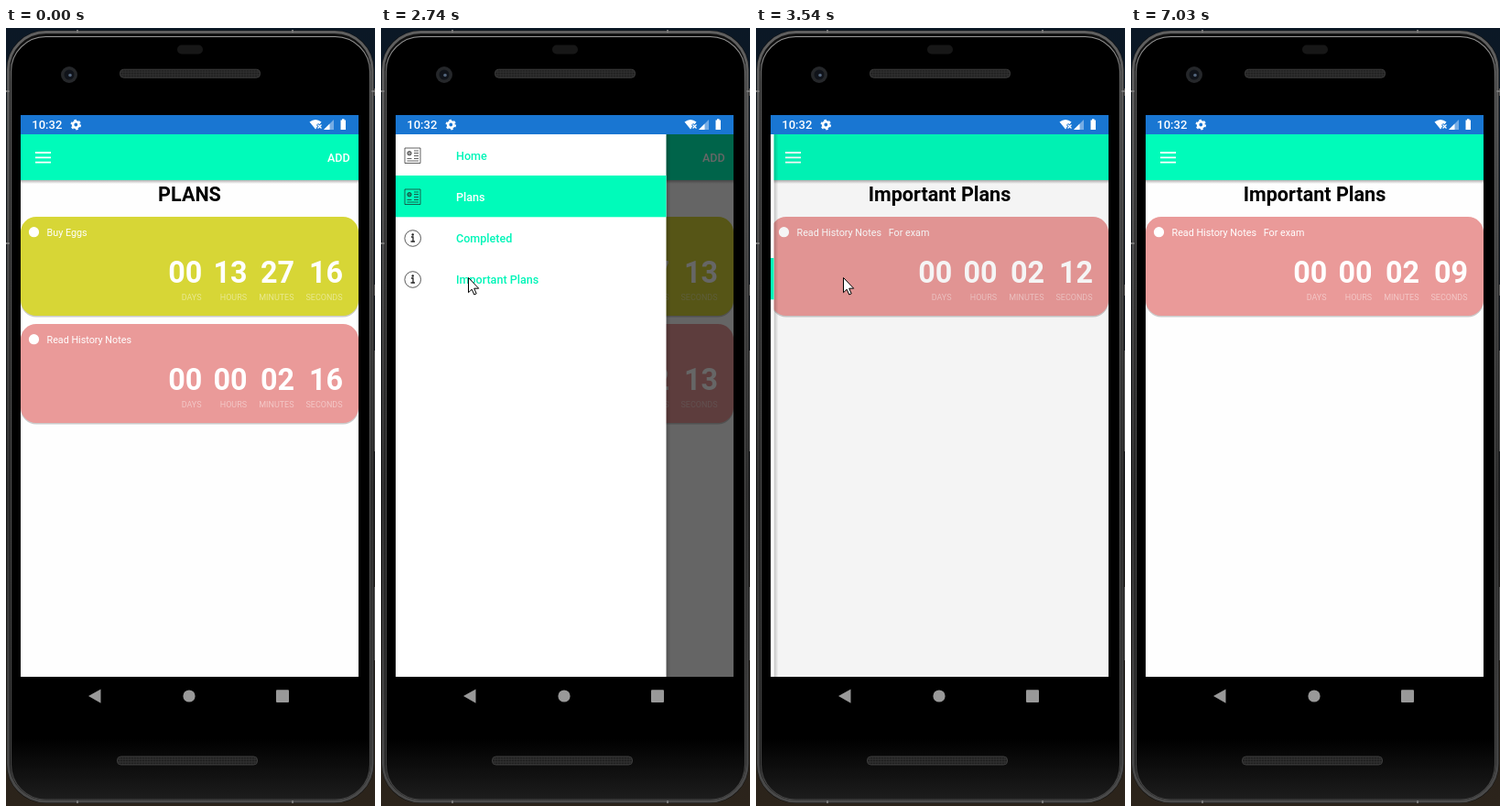
These frames come from a looping animation (403x849 px, 7290 ms). An HTML page:

```html
<!DOCTYPE html>
<html lang="en">
<head>
<meta charset="utf-8">
<title>Plans</title>
<style>
  html, body { margin: 0; width: 100%; height: 100%; overflow: hidden; background: #000; }
  svg { display: block; width: 403px; height: 849px; }
  text { font-family: Roboto, sans-serif; fill: #fff; }
  .title { font-size: 21.55px; font-weight: 700; fill: #000; text-anchor: middle; }
  .medium { font-size: 12.57px; font-weight: 500; }
  .task { font-size: 10.78px; }
  .num { font-size: 32.3px; font-weight: 700; text-anchor: end; }
  .unit { font-size: 8.98px; text-anchor: end; fill-opacity: .45; }
  .item { fill: #00f5b8; }

  #cursor, #drawer, #scrim, #ripple, #plans, #important, #active, #from, #to {
    animation: 7290ms step-end infinite;
  }
  #cursor { animation-name: pointer; }
  #drawer { animation-name: slide; }
  #scrim { animation-name: dim; }
  #ripple { animation-name: press; }
  #plans { animation-name: leave; }
  #important { animation-name: enter; }
  #active { animation-name: select; }
  #from { animation-name: deselect; }
  #to { animation-name: highlight; }

  @keyframes pointer {
    0% { translate: 340px 870px; }
    9.05% { translate: 334px 818px; }
    10.01% { translate: 255px 610px; }
    10.97% { translate: 130px 350px; }
    11.93% { translate: 72px 235px; }
    16.46% { translate: 56px 190px; }
    17.42% { translate: 34px 118px; }
    18.38% { translate: 28px 97px; }
    19.34% { translate: 34px 124px; }
    20.3% { translate: 36.5px 139.5px; }
    26.88% { translate: 38px 147px; }
    27.84% { translate: 43px 164px; }
    28.8% { translate: 48.5px 180.5px; animation-timing-function: steps(8); }
    36.63% { translate: 95.5px 272.5px; }
    50.48% { translate: 94.5px 272.5px; }
    88.07% { translate: 96px 280px; animation-timing-function: steps(4); }
    91.9% { translate: 115px 380px; animation-timing-function: steps(5); }
    96.43%, 100% { translate: 190px 870px; }
  }
  @keyframes slide {
    0% { translate: -304px; }
    26.88% { translate: -190px; }
    27.84% { translate: -35px; }
    28.8% { translate: 0px; }
    44.85% { translate: -12px; }
    46.63% { translate: -210px; }
    47.59% { translate: -277px; }
    48.55% { translate: -292px; }
    49.51%, 100% { translate: -304px; }
  }
  @keyframes dim {
    0% { opacity: 0; }
    26.88% { opacity: .14; }
    27.84% { opacity: .44; }
    28.8% { opacity: .56; }
    30.04% { opacity: .6; }
    46.63% { opacity: .34; }
    47.59% { opacity: .12; }
    48.55% { opacity: .04; }
    49.51% { opacity: .01; }
    50.48%, 100% { opacity: 0; }
  }
  @keyframes press {
    0% { opacity: 0; }
    25.92% { opacity: .15; }
    27.84%, 100% { opacity: 0; }
  }
  @keyframes leave {
    0% { visibility: visible; }
    46.63%, 100% { visibility: hidden; }
  }
  @keyframes enter {
    0% { visibility: hidden; }
    46.63%, 100% { visibility: visible; }
  }
  @keyframes select {
    0% { translate: 0 0; }
    44.85%, 100% { translate: 0 90px; }
  }
  @keyframes deselect {
    0% { fill: #fff; }
    44.85%, 100% { fill: #00f5b8; }
  }
  @keyframes highlight {
    0% { fill: #00f5b8; }
    44.85%, 100% { fill: #fff; }
  }
</style>
</head>
<body>
<svg viewBox="0 0 403 849">
  <defs>
    <linearGradient id="desk" x2="0" y2="1">
      <stop stop-color="#0b1826"/>
      <stop offset=".5" stop-color="#15181c"/>
      <stop offset="1" stop-color="#2c241b"/>
    </linearGradient>
    <linearGradient id="metal" x2="0" y2="1">
      <stop stop-color="#606060"/>
      <stop offset=".3" stop-color="#484848"/>
      <stop offset=".6" stop-color="#303030"/>
      <stop offset="1" stop-color="#4a4a4a"/>
    </linearGradient>
    <linearGradient id="glass" x2="0" y2="1">
      <stop offset=".92" stop-color="#000"/>
      <stop offset="1" stop-color="#1d1d1d"/>
    </linearGradient>
    <linearGradient id="rim" x2="0" y2="1">
      <stop stop-color="#999"/>
      <stop offset=".06" stop-color="#666"/>
      <stop offset="1" stop-color="#444"/>
    </linearGradient>
    <linearGradient id="below" x2="0" y2="1">
      <stop stop-opacity=".3"/>
      <stop offset="1" stop-opacity="0"/>
    </linearGradient>
    <linearGradient id="beside">
      <stop stop-opacity=".2"/>
      <stop offset="1" stop-opacity="0"/>
    </linearGradient>
    <pattern id="mesh" width="3" height="3" patternUnits="userSpaceOnUse">
      <rect width="3" height="3" fill="#303030"/>
      <circle cx="1.5" cy="1.5" r=".9" fill="#151515"/>
    </pattern>
    <clipPath id="screen"><rect x="16" y="95" width="369" height="613"/></clipPath>
    <clipPath id="content"><rect x="16" y="116" width="369" height="592"/></clipPath>

    <g id="speaker">
      <rect width="153" height="9" rx="4" fill="url(#mesh)" stroke="#3c3c3c"/>
    </g>
    <g id="card">
      <rect x="16" y="207.5" width="369" height="108" rx="17" fill="#000" opacity=".2"/>
      <rect x="16" y="206" width="369" height="108" rx="17"/>
      <circle cx="30.5" cy="222.7" r="5.6" fill="#fff"/>
      <text class="num" x="214.2" y="278">00</text>
      <text class="num" id="seconds" x="368" y="278">16</text>
      <text class="unit" x="213.5" y="297">DAYS</text>
      <text class="unit" x="263" y="297">HOURS</text>
      <text class="unit" x="314.5" y="297">MINUTES</text>
      <text class="unit" x="367.5" y="297">SECONDS</text>
    </g>
    <g id="history">
      <use href="#card" fill="#ea9a99"/>
      <text class="task" x="44.5" y="227">Read History Notes</text>
      <text class="num" x="263.5" y="278">00</text>
      <text class="num" x="315" y="278">02</text>
    </g>
    <g id="news" fill="none" stroke="#222" stroke-opacity=".7">
      <path d="M26 131H43V147.500H26ZM28.500 142.500h5M28.500 145h12.500M36 134h5M36 136.500h5M36 139.500h5M36 142.500h5"/>
      <circle cx="31" cy="136.700" r="2.200" fill="#222" fill-opacity=".45"/>
    </g>
    <g id="info" stroke="#222">
      <circle cx="34.700" cy="229.500" r="8.800" fill="none" stroke-opacity=".75"/>
      <path d="M33 228h2v5m-2.500 0h4.500" fill="none" stroke-width="1.300"/>
      <circle cx="34.700" cy="225.500" r="1.200" fill="#222" stroke="none"/>
    </g>
  </defs>

  <!-- Phone -->
  <rect width="403" height="849" fill="url(#desk)"/>
  <path d="M402 66V74M402 280V292M402 352V462M402 610V690" stroke="#555" stroke-width="2"/>
  <rect x=".5" y="2.500" width="401.500" height="843.500" rx="43" fill="#101010"/>
  <rect x="2.500" y="4.500" width="397.500" height="839.500" rx="41" fill="none" stroke="url(#metal)" stroke-width="3"/>
  <path d="M0 69H4M0 235H4M399 69H403M78 2V5M313 2V5M78 843V846M313 843V846" stroke="#777" stroke-width="2"/>
  <rect x="5.500" y="9.500" width="392" height="832.500" rx="38" fill="url(#glass)" stroke="url(#rim)" stroke-width="1.200"/>
  <rect x="187" y="18.500" width="28" height="10" rx="5" fill="#171717"/>
  <circle cx="69" cy="51" r="9" fill="#25272a"/>
  <circle cx="69" cy="51" r="5.500" fill="#10131a"/>
  <circle cx="70" cy="51.500" r="1.800" fill="#53657c"/>
  <use href="#speaker" x="124.500" y="45.200"/>
  <use href="#speaker" x="121.500" y="795"/>
  <g fill="#999">
    <path d="M90 729L103.500 721.500V736.700Z"/>
    <circle cx="200" cy="729" r="6.600"/>
    <rect x="295" y="722.300" width="14" height="13.700" rx="1"/>
  </g>

  <g clip-path="url(#screen)">
    <rect x="16" y="95" width="369" height="613" fill="#fefefe"/>

    <!-- Status bar -->
    <rect x="16" y="95" width="369" height="21" fill="#1976d2"/>
    <text x="28.300" y="110.300" font-size="13" font-weight="500">10:32</text>
    <circle cx="76.300" cy="105.500" r="3.200" fill="none" stroke="#fff" stroke-width="2.600"/>
    <circle cx="76.300" cy="105.500" r="4.900" fill="none" stroke="#fff" stroke-width="1.800" stroke-dasharray="2.600 2.530"/>
    <path d="M331.500 102.500Q338 97.500 344.500 102.500L338 110.500Z" fill="#fff"/>
    <path d="M340 105L345 110M345 105L340 110" stroke="#1976d2" stroke-width="3"/>
    <path d="M340.500 105.500L344.500 109.500M344.500 105.500L340.500 109.500" stroke="#fff" stroke-width="1.200"/>
    <path d="M347 111L358 100V111Z" fill="#fff" opacity=".4"/>
    <path d="M347 111L353.500 104.500V111Z" fill="#fff"/>
    <path d="M365.500 100.500H367V99.300H369.500V100.500H371V111H365.500Z" fill="#fff"/>

    <!-- Pages -->
    <rect x="16" y="166" width="369" height="4" fill="url(#below)"/>
    <rect x="16" y="116" width="369" height="50" fill="#00fbba"/>
    <circle id="ripple" cx="40.500" cy="141" r="19.500"/>
    <path d="M32 136H49M32 141.300H49M32 146.700H49" stroke="#fff" stroke-width="1.800"/>
    <g id="plans">
      <text class="medium" x="351" y="146">ADD</text>
      <text class="title" x="200.500" y="189">PLANS</text>
      <use href="#card" fill="#d7d636"/>
      <text class="task" x="44.500" y="227">Buy Eggs</text>
      <text class="num" x="263.500" y="278">13</text>
      <text class="num" x="315" y="278">27</text>
      <use href="#history" y="117"/>
    </g>
    <g id="important">
      <text class="title" x="200.500" y="189">Important Plans</text>
      <use href="#history"/>
      <text class="task" x="144.700" y="227">For exam</text>
    </g>

    <!-- Drawer -->
    <g clip-path="url(#content)">
      <rect id="scrim" x="16" y="116" width="369" height="592"/>
      <g id="drawer">
        <rect x="311.500" y="116" width="5" height="592" fill="url(#beside)"/>
        <rect x="10" y="116" width="301.500" height="592" fill="#fff"/>
        <rect id="active" x="10" y="161" width="301.500" height="45.300" fill="#00fbba"/>
        <use href="#news"/>
        <use href="#news" y="45"/>
        <use href="#info"/>
        <use href="#info" y="45"/>
        <text class="medium item" x="82" y="143.500">Home</text>
        <text class="medium item" id="from" x="82" y="188.500">Plans</text>
        <text class="medium item" x="82" y="233.500">Completed</text>
        <text class="medium item" id="to" x="82" y="278.500">Important Plans</text>
      </g>
    </g>
  </g>

  <path id="cursor" d="M0 0V16.200L3.700 12.700L6.300 18.500L8.700 17.400L6.200 11.700H11.200Z" fill="#fff" stroke="#000"/>
</svg>
<script>
  const LOOP = 7290;
  const ticks = [130, 1200, 2190, 3200, 4420, 5350, 6350];
  const seconds = document.getElementById('seconds');
  const clock = document.getElementById('cursor').getAnimations()[0];

  function countDown() {
    const time = (clock.currentTime ?? 0) % LOOP;
    const left = 16 - ticks.filter(tick => tick <= time).length;
    const label = String(left).padStart(2, '0');
    if (seconds.textContent !== label) seconds.textContent = label;
    requestAnimationFrame(countDown);
  }
  countDown();
</script>
</body>
</html>
```
